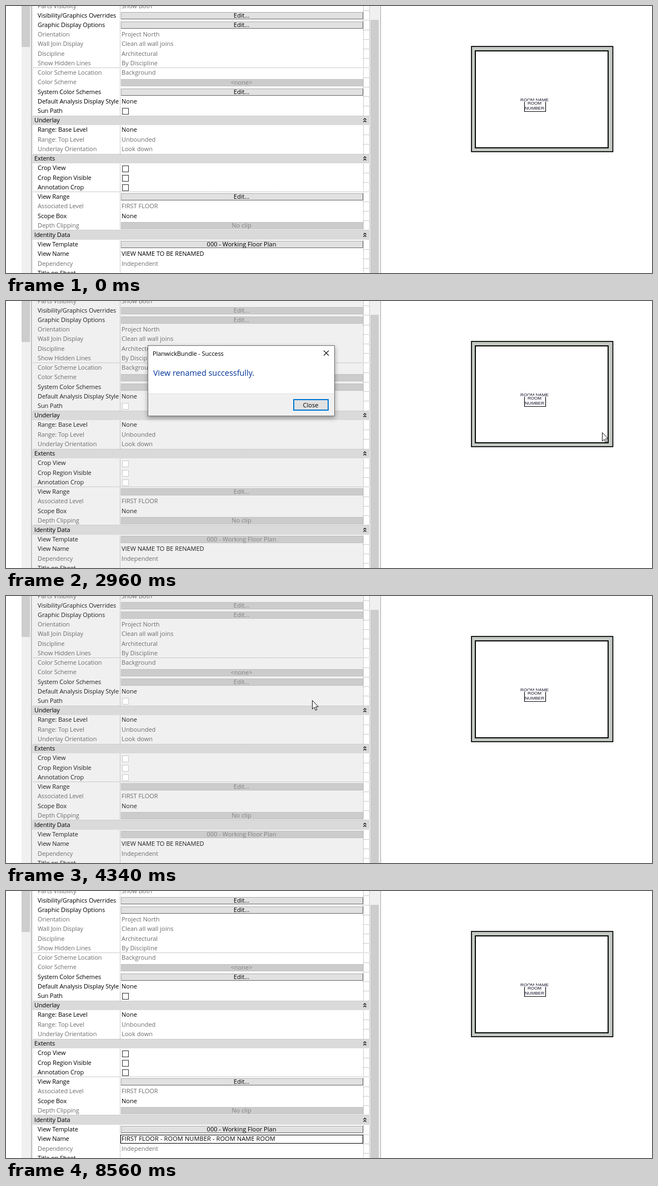
Recreate the animation shown at these times as an HTML page. Size 1163 by 482 pixels, loop 9.02 s.

```html
<!DOCTYPE html>
<html lang="en">
<head>
<meta charset="utf-8">
<title>Renaming a view</title>
<style>
  html, body { margin: 0; width: 100%; height: 100%; overflow: hidden; background: #fff; }
  svg { display: block; width: 1163px; height: 482px; }
  text { font: 11px "Open Sans", "Noto Sans", sans-serif; white-space: pre; }
  .label { letter-spacing: -.1px; }
  .mid { text-anchor: middle; }
  .tag { font: 8.1px "Liberation Sans", Arial, sans-serif; fill: #101028; text-anchor: middle; }
  .dots { stroke: #999; stroke-dasharray: 1 1; }
</style>
</head>
<body>
<svg id="stage" viewBox="0 0 1163 482" xmlns="http://www.w3.org/2000/svg"></svg>
<script>
const LOOP = 9020, TICKS = 137, PITCH = 17.23;
const OLD_NAME = "VIEW NAME TO BE RENAMED";
const NEW_NAME = "FIRST FLOOR - ROOM NUMBER - ROOM NAME ROOM";

// kind: h header, r read-only, e editable, b button, d disabled button, c checkbox
const rows = [
  "r|Parts Visibility|Show Both",
  "b|Visibility/Graphics Overrides|Edit...",
  "b|Graphic Display Options|Edit...",
  "r|Orientation|Project North",
  "r|Wall Join Display|Clean all wall joins",
  "r|Discipline|Architectural",
  "r|Show Hidden Lines|By Discipline",
  "r|Color Scheme Location|Background",
  "d|Color Scheme|&lt;none&gt;",
  "b|System Color Schemes|Edit...",
  "e|Default Analysis Display Style|None",
  "c|Sun Path|",
  "h|Underlay|",
  "e|Range: Base Level|None",
  "r|Range: Top Level|Unbounded",
  "r|Underlay Orientation|Look down",
  "h|Extents|",
  "c|Crop View|",
  "c|Crop Region Visible|",
  "c|Annotation Crop|",
  "b|View Range|Edit...",
  "r|Associated Level|FIRST FLOOR",
  "e|Scope Box|None",
  "d|Depth Clipping|No clip",
  "h|Identity Data|",
  "b|View Template|000 - Working Floor Plan",
  "e|View Name|",
  "r|Dependency|Independent",
  "e|Title on Sheet|"
].map(row => row.split("|"));

const rect = (x, y, w, h, fill, more = "") =>
  `<rect x="${x}" y="${y}" width="${w}" height="${h}" fill="${fill}" ${more}/>`;
const text = (x, y, str, fill, cls = "", more = "") =>
  `<text x="${x}" y="${y}" fill="${fill}" class="${cls}" ${more}>${str}</text>`;
const path = (d, stroke, more = "") => `<path d="${d}" stroke="${stroke}" fill="none" ${more}/>`;

function button(y, caption, on) {
  const look = on ? ["#e1e1e1", "#adadad", "#000"] : ["#ccc", "#bfbfbf", "#838383"];
  return rect(207.5, y - 5.5, 435, 12, look[0], `stroke="${look[1]}"`) +
    (on ? path(`M207 ${y + 6.5}H642.5V${y - 6}`, "#696969") : "") +
    text(424, y + 4, caption, look[2], "mid");
}

function drawRow([kind, label, value], i, on) {
  const mid = i * PITCH - .5, base = Math.round(mid + 4), y = Math.round(mid + .2);
  const top = Math.round(mid - 8.6), bottom = Math.round(mid + 8.6);
  if (kind === "h") {
    return rect(47, top + 1, 608, bottom - top - 1, "#dadada") +
      text(51, base, label, "#000", "label") +
      path(`M643.5 ${y - .5}l2.5 -2.5 2.5 2.5M643.5 ${y + 3.5}l2.5 -2.5 2.5 2.5`, "#000", 'stroke-width="1.2"');
  }
  const fixed = kind === "r" || kind === "d";
  const ink = fixed ? "#6d6d6d" : on ? "#000" : "#222";
  let out = rect(49, top, 594, bottom - top, on ? "#fff" : "#f0f0f0") +
    text(57, base, label, ink, "label");
  if (kind === "b" || kind === "d") out += button(y, value, on && kind === "b");
  else if (kind === "c") out += rect(209.5, y - 4.5, 11, 11, "#fff", `stroke="${on ? "#333" : "#ccc"}"`);
  else out += text(208, base, value, ink);
  const sides = [205.5, 643.5, 654.5].map(x => `M${x} ${top + 1}V${bottom}`).join("");
  return out + path(`M49 ${bottom + .5}H655${sides}`, "", 'class="dots"');
}

const panel = on => `<g id="${on ? "live" : "locked"}">${rows.map((r, i) => drawRow(r, i, on)).join("")}</g>`;

const frame = rect(0, 0, 28, 482, "#fff", 'id="strip"') +
  rect(28, 0, 16, 482, "#f0f0f0") + rect(28, 0, 15, 74, "#cdcdcd") +
  rect(44, 0, 631, 482, "#f0f0f0") + rect(45, 0, 1.5, 482, "#b4b4b4") +
  rect(49, 0, 606, 482, "#fff") + rect(656, 25, 15, 457, "#cdcdcd") +
  rect(674, 0, 1, 482, "#a8a8a8");

const field = rect(206.5, 440.5, 436, 15, "#fff", 'id="box" stroke="#000"') +
  rect(207.5, 440, 278, 14, "#0078d7", 'id="selection"') +
  text(208, 451, "", "#000", "", 'id="name"') +
  rect(485, 440, 1, 14, "#000", 'id="caret"');

const room = rect(838, 73, 254.5, 190, "#c5cac5", 'stroke="#000" stroke-width="1.7"') +
  rect(845, 81, 239, 175, "#fff", 'stroke="#000" stroke-width="1.9"') +
  text(951.5, 171.5, "ROOM NAME", "", "tag") + rect(938, 171, 27, 8, "#fff") +
  text(951.5, 178.3, "ROOM", "", "tag") + text(951.5, 187.4, "NUMBER", "", "tag") +
  path("M933.5 173V190.5H971.5V173", "#111", 'stroke-width="1.2"');

const dialog = `<g id="dialog">` +
  rect(255.5, 80.5, 336, 127, "#fff", 'stroke="#707070" filter="url(#shade)"') +
  rect(256, 168, 335, 39, "#f0f0f0") + path("M256 167.5H591", "#dfdfdf") +
  text(264, 98.5, "PlanwickBundle - Success", "#000", "label") +
  path("M572 89.5l9 9M581 89.5l-9 9", "#111", 'stroke-width="1.1"') +
  text(265, 135, "View renamed successfully.", "#003399", "", 'style="font-size:14.4px"') +
  rect(518, 178, 62, 19, "#e1e1e1", 'id="close" stroke="#0078d7" stroke-width="2"') +
  text(548.5, 191.5, "Close", "#000", "mid") + `</g>`;

const pointers = `<path id="arrow" d="M.5 .5V16L4 12.8 6.3 18.3 8.7 17.3 6.4 11.9H11.2Z" fill="#fff" stroke="#111"/>` +
  path("M-3 -6.5H-.8L0 -5.7 .8 -6.5H3M0 -6V6M-3 6.5H-.8L0 5.7 .8 6.5H3", "#111", 'id="beam" stroke-width="1.1"');

const stage = document.getElementById("stage");
stage.innerHTML = `<defs><filter id="shade" x="-10%" y="-20%" width="120%" height="145%">
  <feDropShadow dx="0" dy="3" stdDeviation="4" flood-color="#000" flood-opacity=".35"/></filter></defs>` +
  frame + panel(true) + panel(false) + field + room + dialog + pointers;

const part = Object.fromEntries([...stage.querySelectorAll("[id]")].map(el => [el.id, el]));
const show = (el, yes) => el.setAttribute("display", yes ? "inline" : "none");

// Pointer visits as [tick, x, y]; each visit ends when its last tick is reached.
const visits = [
  { end: 9, keys: [[2, 1094, 466], [3, 1080, 360], [4, 1048, 240], [5, 985, 200], [6, 900, 168], [8, 725, 126]] },
  { end: 85, keys: [[32, 527, 2], [33, 640, 40], [34, 770, 88], [35, 870, 126], [37, 1020, 205], [38, 1060, 229],
    [39, 1073, 237], [46, 1073, 237], [48, 1015, 197], [50, 894, 130.5], [52, 757, 120], [54, 649, 131],
    [57, 592, 168], [61, 561, 187], [64, 555, 189], [66, 551, 188], [69, 551, 188], [71, 557, 212],
    [76, 586, 371], [79, 583, 414], [83, 560, 444], [84, 560, 447]] },
  { end: 105, beam: true, keys: [[85, 559, 451], [87, 560, 449], [100, 560, 449], [101, 550, 450], [102, 515, 458], [103, 455, 468], [104, 394, 477]] },
  { end: 130, keys: [[125, 1081, 468], [126, 1086, 443], [127, 1098, 432], [128, 1116, 441], [129, 1137, 468]] }
];

function along(keys, t) {
  const i = keys.findIndex(k => k[0] > t);
  if (i < 0) return keys[keys.length - 1].slice(1);
  const [a, b] = [keys[i - 1], keys[i]], f = (t - a[0]) / (b[0] - a[0]);
  return [a[1] + (b[1] - a[1]) * f, a[2] + (b[2] - a[2]) * f];
}

function dialogLevel(t) {
  if (t < 42 || t > 65) return 0;
  return t < 63 ? Math.min(1, (t - 41) / 4) : [.7, .4, .12][t - 63];
}

function drawPointer(t) {
  const visit = visits.find(v => t >= v.keys[0][0] && t < v.end);
  show(part.arrow, visit && !visit.beam);
  show(part.beam, visit && visit.beam);
  if (!visit) return;
  const [x, y] = along(visit.keys, t);
  part[visit.beam ? "beam" : "arrow"].setAttribute("transform", `translate(${x} ${y})`);
  const hover = x > 517 && x < 581 && y > 177 && y < 198;
  part.close.setAttribute("fill", hover ? "#e5f1fb" : "#e1e1e1");
  part.close.setAttribute("stroke-width", hover ? 1.2 : 2);
}

function draw(ms) {
  const t = Math.floor((ms % LOOP + 9) / (LOOP / TICKS)) % TICKS;
  const locked = t >= 25 && t < 67, picked = t >= 85 && t < 111;
  show(part.live, !locked);
  show(part.locked, locked);
  part.strip.setAttribute("fill", t >= 26 && t < 41 ? "#e3e3e3" : "#fff");

  const renamed = t >= 67;
  part.name.textContent = renamed ? NEW_NAME : OLD_NAME;
  part.name.setAttribute("letter-spacing", renamed ? .12 : 0);
  part.name.setAttribute("fill", picked ? "#fff" : locked ? "#222" : "#000");
  show(part.selection, picked);
  show(part.box, t >= 111);
  show(part.caret, (t >= 89 && t < 97) || (t >= 105 && t < 111));

  const level = dialogLevel(t), scale = .955 + .045 * level;
  show(part.dialog, level > 0);
  part.dialog.setAttribute("opacity", level);
  part.dialog.setAttribute("transform", `translate(423.5 144) scale(${scale}) translate(-423.5 -144)`);
  drawPointer(t);
}

const start = performance.now();
function loop() {
  draw(performance.now() - start);
  requestAnimationFrame(loop);
}
loop();
</script>
</body>
</html>
```
